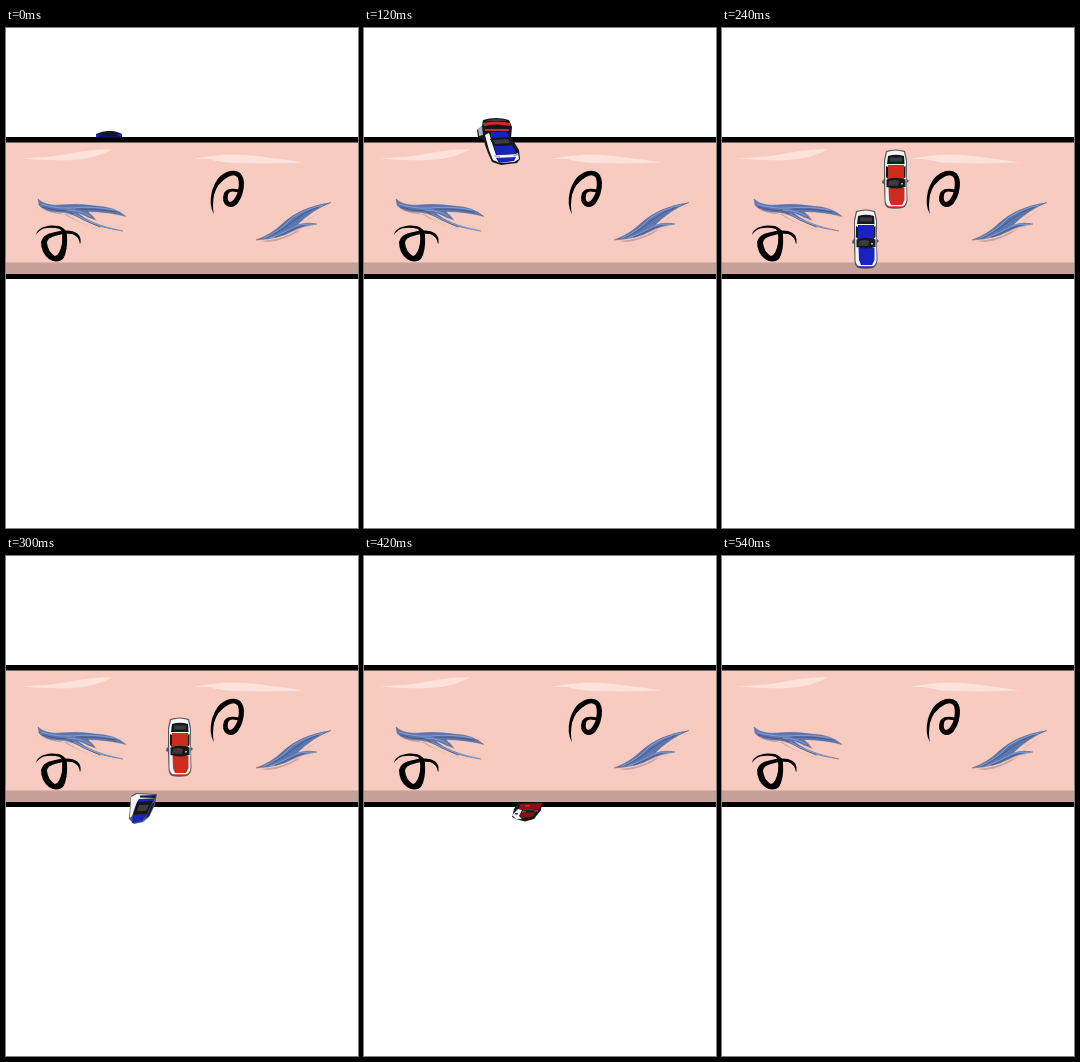
Recreate the animation shown at these times as an HTML page. Size 352 by 500 pixels, loop 1.04 s.

```html
<!DOCTYPE html>
<html lang="en">
<head>
<meta charset="utf-8">
<title>Cars over an arm</title>
<style>
html, body { margin: 0; width: 100%; height: 100%; overflow: hidden; background: #fff; }
svg { display: block; width: 100vw; height: 100vh; }

/* Each pose is visible for one 30 ms step of the loop. */
.car use {
  visibility: hidden;
  animation: show 1040ms step-end infinite;
  animation-delay: calc((var(--k) + var(--lag)) * 30ms);
}
@keyframes show {
  0% { visibility: visible; }
  2.8846%, 100% { visibility: hidden; }
}
.blue { --c: #1a22c0; --d: #10165f; --lag: 0; }
.red { --c: #cf2c20; --d: #7c1714; --lag: 3; }

.c { fill: var(--c); }
.d { fill: var(--d); }
.k { fill: #15171b; }
.g { fill: #3a3c40; }
.w { fill: #f3f4f7; }
.s { fill: #aeb1b8; }
.edge { fill: #53565d; }
.vein { fill: #5c76b0; stroke: #56658f; stroke-width: .4; }
.shade { fill: #c9a5a2; }
.gleam, .crease { fill: none; stroke: #8ba2d0; stroke-width: .9; stroke-linecap: round; }
.crease { stroke: #465681; }
.shine { fill: #fee1da; }
</style>
</head>
<body>
<svg viewBox="0 0 352 500" preserveAspectRatio="none">
<defs>
  <!-- roof coming up behind the edge -->
  <g id="peek">
    <path class="d" d="M90 109.5L90 106Q96 103 103 103Q111 103 116 106L116 109.5Z"/>
    <path class="k" d="M95 106Q98 103 104 103Q110 103 112 106L109 108L97 108Z"/>
    <path class="c" d="M90 106h3v3h-3zM112 106h3v2h-3z"/>
  </g>

  <!-- nose in the air -->
  <g id="rise">
    <path class="k" d="M84 109L83 102L88 98L89 92Q102 88 115 92L118 99L117 110L107 112L90 112Z"/>
    <path class="c" d="M89 95Q102 92 116 95L116 98Q102 95 90 98ZM91 101L115 101L115 103L91 103Z"/>
    <path class="g" d="M93 92Q103 90 112 92L112 93L93 93Z"/>
    <path class="s" d="M84 101L88 98L89 107L85 108Z"/>
    <path class="d" d="M91 106h23v2h-23z"/>
  </g>

  <g id="crest">
    <path class="k" d="M89 108L91 100L97 91Q108 88 119 91L126 100L126 111L119 114L94 114Z"/>
    <path class="c" d="M96 98Q109 95 123 98L124 102L95 102ZM100 106h22v3h-22z"/>
    <path class="g" d="M99 93Q109 90 118 93L120 96L97 97Z"/>
    <path class="w" d="M90 102L94 99L97 109L91 109Z"/>
  </g>

  <!-- front view -->
  <g id="front">
    <path class="k" d="M97 106L100 102L105 96Q115 94.500 125 96L129 101L133 104L133 114L128 115L125 113L105 113L103 115L97 112Z"/>
    <path class="w" d="M98 105L102 102L105 103L106 108L103 109L99 108Z"/>
    <path class="s" d="M98 110l5 0v3l-4-1zM102 105l4 1v2l-3-1z"/>
    <path class="c" d="M105 102.500L128 102L131 104L129 105L107 105ZM107 110L113 111L113 112.500L107 112ZM120 111L130 109.500L130 112L120 112.500ZM126 106L132 105L132 107L127 108Z"/>
    <path class="d" d="M107 106h18v1h-18zM112 111h9v1.500h-9z"/>
    <path class="g" d="M106 98L125 98L127 101L104 101Z"/>
  </g>

  <!-- tipping down onto the skin -->
  <g id="dive">
    <path class="k" d="M119 107L123 103L143 103L147 109L155 122L156 131L153 135L137 137L128 134L124 125L121 117Z"/>
    <path class="w" d="M121 107L125 105L128 115L132 127L151 126L154 125L155 131L150 134L136 135L129 132L125 122Z"/>
    <path class="c" d="M127 104L143 104L145 109L127 110ZM130 118L148 117L153 126L133 127Z"/>
    <path class="k" d="M126 111L146 110L149 117L130 118Z"/>
    <path class="g" d="M129 112L144 111L146 115L131 116Z"/>
    <path class="c" d="M132 130L152 129L150 133L135 135Z"/>
    <path class="s" d="M130 127l6 1v2l-5-1zM149 127l5-2v2l-4 2z"/>
  </g>

  <!-- seen from above, nose down -->
  <g id="top">
    <path class="edge" d="M134 123Q144 120 153 123L155 132L155 151L157 153L155 155L155.500 172Q155 178 151 180Q143 181.500 136 180Q132.500 178 132.500 172L132 156L130 155L130.500 152.500L132 151L132 132Z"/>
    <path class="w" d="M135 124Q144 121 152 124L154 133L154.500 172Q154 177 150 179H138Q133.500 177 133.500 172L133 133Z"/>
    <path class="k" d="M136 128Q144 125.500 152 128L152.500 136L135 136ZM134 138l2 1v12l-2-2zM153.500 138l-2 1v12l2-2z"/>
    <path class="g" d="M138 129.500h12v4h-12z"/>
    <path class="c" d="M136 137L152 137L152 152L136 152ZM136.500 160L152.500 160L152.500 172L150 177L139 177L137 172Z"/>
    <path class="k" d="M134.500 151.500Q144 148 153.500 151.500L153.500 159Q144 162 134.500 159Z"/>
    <path class="g" d="M137 153Q143 151 147 153L146 158L136 157.500Z"/>
    <path class="s" d="M149 155h2v1.500h-2z"/>
    <path class="c" d="M136 178.200L152 178.200L150 179.800L138 179.800Z"/>
  </g>

  <!-- tail lifting as it leaves -->
  <g id="tip">
    <path class="edge" d="M125 240L130 237L151 238L149 249L143 261L137 266L128 268L123 263L124 250Z"/>
    <path class="w" d="M125 241L131 238L149 239L148 242L133 243L129 251L126 260L124 262Z"/>
    <path class="d" d="M134 239.500L150 239L149 242L134 241.500ZM146 248L149 246L143 260L140 262Z"/>
    <path class="c" d="M133 243L148 243L147 246L131 246ZM127 259L141 258L136 265L126 267Z"/>
    <path class="k" d="M131 246L147 245L141 258L127 259Z"/>
    <path class="g" d="M133 249h10l-3 6h-9z"/>
  </g>

  <g id="drop">
    <path class="k" d="M124 247L148 246L147 254L140 263L131 265.500L122 263L118 261L120 253Z"/>
    <path class="d" d="M126 248L148 247L146 253L125 253ZM126 257L142 256L138 261L127 262Z"/>
    <path class="c" d="M131 249h5v1.500h-5zM140 254h4v1.500h-4zM128 255h4v1.500h-4z"/>
    <path class="w" d="M118 259L124 253L128 254L125 260L128 263L122 263Z"/>
    <path class="g" d="M129 253h12v1.500h-12zM121 257h3v1.500h-3z"/>
  </g>

  <g id="sink">
    <path class="k" d="M121 250L143 249L141 255L135 259L123 258Z"/>
    <path class="d" d="M126 251L141 250L139 254L126 254Z"/>
    <path class="s" d="M121 253l4-1 1 4-3 1z"/>
  </g>

  <g id="last"><path class="k" d="M122 250h15l-3 3h-9z"/></g>

  <g id="ride">
    <use href="#peek" style="--k:0"/>
    <use href="#rise" style="--k:1"/>
  </g>
</defs>

<rect width="352" height="500" fill="#fff"/>

<!-- arm -->
<rect y="109" width="352" height="142"/>
<rect y="114.500" width="352" height="131.500" fill="#f7cbbf"/>
<rect y="234.500" width="352" height="11.500" fill="#c6a19a"/>
<path class="shine" d="M15 130.500Q48 129 67 125Q87 121 107 121Q89 131 66 132Q40 133 15 130.500Z"/>
<path class="shine" d="M188 131Q215 125 240 127Q270 130 297 134.500Q260 136 235 135Q216 135 203 131Z"/>

<!-- veins -->
<path class="shade" d="M36 181Q47 187 60 186Q78 198 98 203L80 197Q65 191 58 186ZM80 189L91 193L86 186Z"/>
<path class="vein" d="M32 171Q39 178 54 177Q73 175 90 178Q110 179 120 188.500Q104 184 82 183.500L89 191.500Q79 188 71 184Q82 196 117 203Q94 200 78 192Q68 186 58 184.500Q38 184 33 177Z"/>
<path class="crease" d="M36 179Q48 183 62 183Q76 192 94 199M70 181Q90 180 110 184"/>
<path class="gleam" d="M35 176Q50 181 65 180Q90 178 108 182M61 182Q75 182 84 188M68 186Q84 196 108 201"/>
<path class="shade" d="M254 213Q275 212 290 203Q300 201 307 197L293 203Q280 212 263 214ZM300 193L319 181L304 191Z"/>
<path class="vein" d="M250 212Q266 206 276 196Q294 179 325 174.500Q306 182 291 197Q302 193.500 311 196Q297 197.500 287 203Q273 211 250 212Z"/>
<path class="crease" d="M262 209Q278 201 287 193Q298 184 312 179M270 209Q284 202 298 197"/>
<path class="gleam" d="M258 210Q275 203 286 190Q299 181 317 177M264 210Q280 204 290 198Q299 195.500 306 196"/>

<!-- curled hairs -->
<path d="M208 186.500Q202.500 177 206 163Q211 146 224 143Q237 141 238 155Q238 166 232 175Q227 181 221 178Q215 174 218 165Q221 159.500 230 161Q235 162 238 160Q235 164.500 230 164Q223 162 222 167Q221 173 224 174Q228 173 231 166Q234 157 232 150Q229 145 222 149Q211 155 208 167Q206 178 208 186.500Z"/>
<path d="M30 207Q31 199 45 197.500Q60 197 61 207Q62 223 57 231Q51 236 43 231Q35 225 35 214Q37 206 47 204.500Q64 200 72 206Q76 211 74 216.500Q73 208 66 206Q58 205 49 208Q41 210 41 215Q42 224 49 228Q54 227 56 215Q57 205 54 201Q46 199 38 200.500Q32 203 30 207Z"/>

<g class="car red" transform="translate(30 0)">
  <use href="#peek" style="--k:0"/>
  <use href="#rise" style="--k:1"/>
  <use href="#crest" style="--k:2"/>
  <use href="#front" style="--k:3"/>
  <use href="#dive" style="--k:4"/>
  <use href="#top" style="--k:5"/>
  <use href="#top" y="20" style="--k:6"/>
  <use href="#top" y="40" style="--k:7"/>
  <use href="#top" y="60" style="--k:8"/>
  <use href="#top" y="80" style="--k:9"/>
  <use href="#tip" style="--k:10"/>
  <use href="#drop" style="--k:11"/>
  <use href="#sink" style="--k:12"/>
  <use href="#last" style="--k:13"/>
</g>
<g class="car blue">
  <use href="#peek" style="--k:0"/>
  <use href="#rise" style="--k:1"/>
  <use href="#crest" style="--k:2"/>
  <use href="#front" style="--k:3"/>
  <use href="#dive" style="--k:4"/>
  <use href="#top" style="--k:5"/>
  <use href="#top" y="20" style="--k:6"/>
  <use href="#top" y="40" style="--k:7"/>
  <use href="#top" y="60" style="--k:8"/>
  <use href="#top" y="80" style="--k:9"/>
  <use href="#tip" style="--k:10"/>
  <use href="#drop" style="--k:11"/>
  <use href="#sink" style="--k:12"/>
  <use href="#last" style="--k:13"/>
</g>
</svg>
</body>
</html>
```
